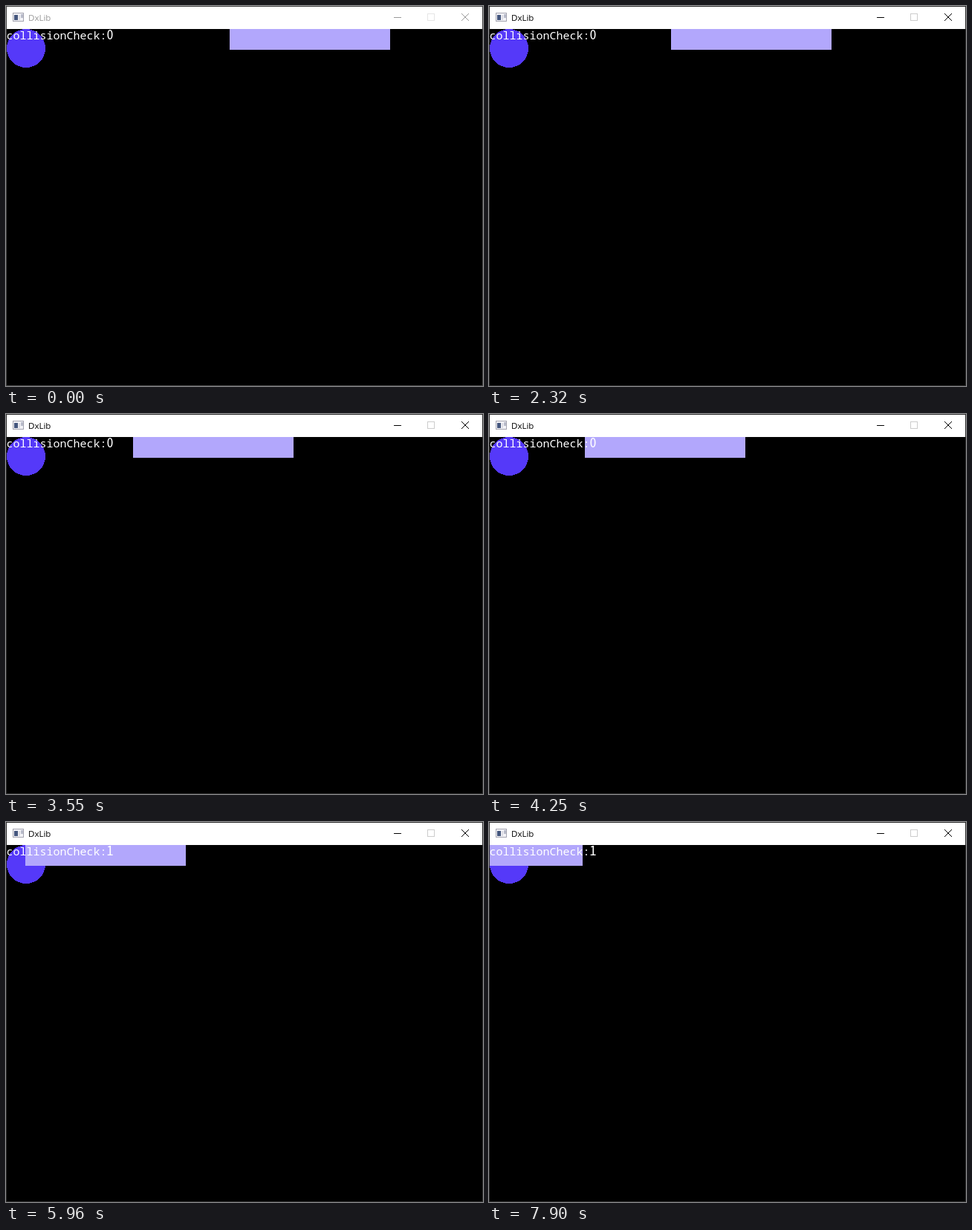
An HTML page for the animation above (7.99 s loop, 642x512 px).

```html
<!DOCTYPE html>
<html lang="en">
<head>
<meta charset="utf-8">
<style>
  html, body { margin: 0; width: 100%; height: 100%; overflow: hidden; background: #000; }
  svg { display: block; width: 642px; height: 512px; --ink: #999; --faint: #e6e6e6; --edge: #434343; }
  svg.active { --ink: #000; --faint: #ccc; --edge: #2b2b2b; }
  .title { font: 11.5px "Open Sans", "Noto Sans", sans-serif; fill: var(--ink); }
  .log { font: 15px "Noto Sans Mono", "DejaVu Sans Mono", monospace; fill: #fff; }
  .value { font: 18px "Noto Sans Mono CJK JP", "Noto Sans CJK JP", sans-serif; }
  .line { fill: none; stroke: var(--ink); }
</style>
</head>
<body>
<svg id="win" viewBox="0 0 642 512">
  <rect width="642" height="512"/>
  <circle cx="27" cy="57" r="26" fill="#5539f9" shape-rendering="crispEdges"/>
  <rect id="bar" y="31" width="216" height="28" fill="#b2a7fc"/>
  <text class="log" x=".5" y="45">collisionCheck:<tspan id="hit" class="value">0</tspan></text>
  <rect width="642" height="31" fill="#fff"/>
  <rect x=".5" y=".5" width="641" height="511" fill="none" stroke="var(--edge)"/>
  <g shape-rendering="crispEdges">
    <rect x="9.5" y="9.5" width="14" height="11" fill="#f3f3f7" stroke="#a4a4b0"/>
    <rect x="11" y="12" width="5" height="7" fill="#46587f"/>
    <rect x="17" y="12" width="2" height="7" fill="#dcdce4"/>
    <rect x="20" y="11" width="3" height="5" fill="#b9bccb"/>
    <path class="line" d="M522 15.5h10"/>
    <rect x="567.5" y="10.5" width="9" height="9" fill="none" stroke="var(--faint)"/>
  </g>
  <text class="title" x="30" y="20">DxLib</text>
  <path class="line" d="M613 10l10 10M623 10l-10 10"/>
</svg>
<script>
const LOOP = 7990, FOCUS = 890;
const START = 1460, TICK = 77.35;   // the bar moves in even ticks
const REST_X = 300.75, STEP = 4.65;
const TOUCH_X = 53;                 // right edge of the circle

const win = document.getElementById("win");
const bar = document.getElementById("bar");
const hit = document.getElementById("hit");

function draw(now) {
  const t = now % LOOP;
  const ticks = Math.max(0, Math.floor((t - START) / TICK + 1));
  const x = Math.round(REST_X - STEP * ticks);
  win.classList.toggle("active", t >= FOCUS);
  bar.setAttribute("x", x);
  hit.textContent = x <= TOUCH_X ? 1 : 0;
  requestAnimationFrame(draw);
}
draw(0);
</script>
</body>
</html>
```
